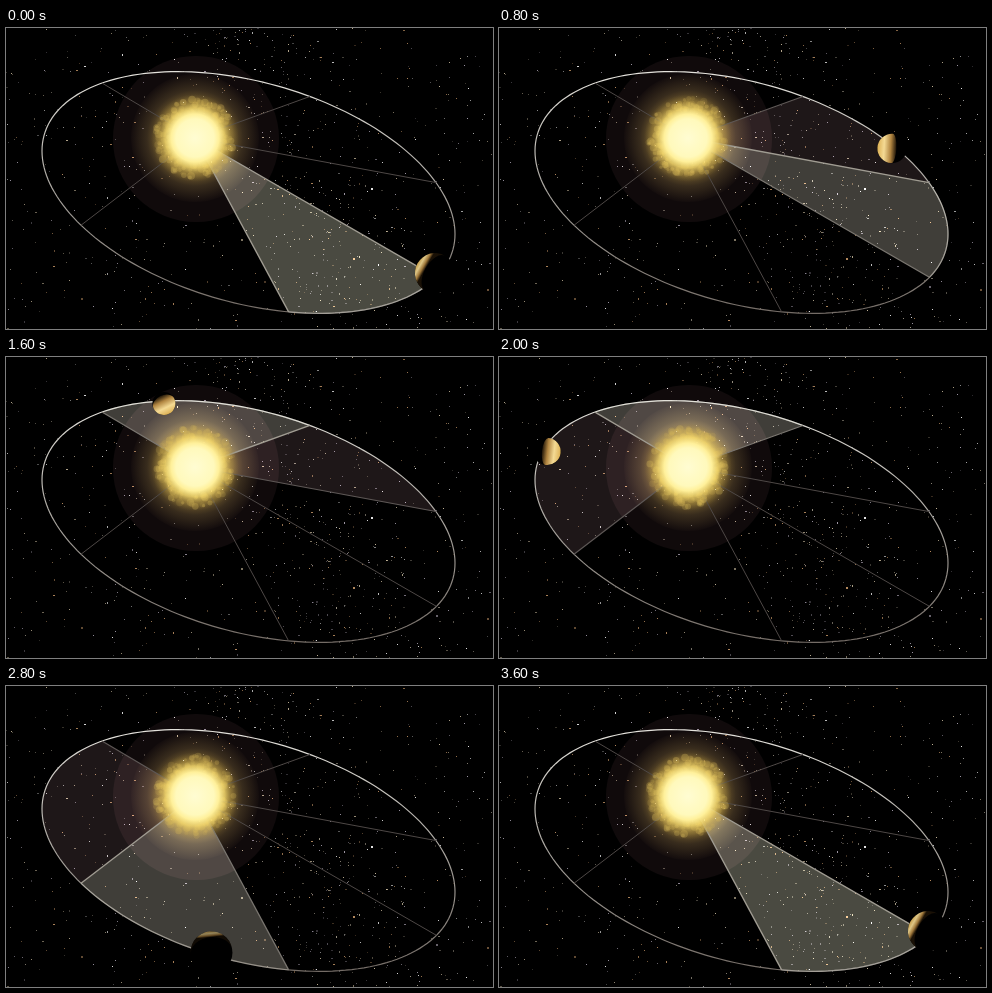
Animation, 487 px wide and 301 px high, one loop 3800 ms. Source, as an HTML page with a canvas:

```html
<!DOCTYPE html>
<html lang="en">
<head>
<meta charset="utf-8">
<title>Equal areas in equal times</title>
<style>
  html, body { margin: 0; width: 100%; height: 100%; overflow: hidden; background: #000; }
  canvas { display: block; }
</style>
</head>
<body>
<canvas id="stage" width="487" height="301"></canvas>
<script>
const WIDTH = 487, HEIGHT = 301;
const STEP_MS = 200, STEPS = 19, STEPS_PER_ORBIT = 18, STEPS_PER_SECTOR = 3;
const sun = { x: 189, y: 110 };
// Orbit angles (degrees) of the sector borders, in the direction of travel.
const borders = [24.5, -24.8, -72.7, -135.2, -215.8, -281.2, -335.5];
const sectorColors = ['#1e1718', '#403e39', '#4a4a41'];
const spokeColors = ['#4e4846', '#5e5856', '#7a7670', '#a09c92'];
const ctx = document.getElementById('stage').getContext('2d');

function randomizer(seed) {
  return () => {
    seed = (seed * 1664525 + 1013904223) % 4294967296;
    return seed / 4294967296;
  };
}

function orbitPoint(degrees, scale = 1) {
  const a = degrees * Math.PI / 180;
  return {
    x: 242.5 + scale * 206.5 * Math.cos(a),
    y: 164.5 + scale * (41.5 * Math.cos(a) + 113.5 * Math.sin(a))
  };
}

function traceOrbit(from, to) {
  const count = Math.ceil(Math.abs(to - from) / 2);
  for (let i = 0; i <= count; i++) {
    const p = orbitPoint(from + (to - from) * i / count);
    ctx.lineTo(p.x, p.y);
  }
}

function disc(x, y, radius, fill) {
  ctx.fillStyle = fill;
  ctx.beginPath();
  ctx.arc(x, y, radius, 0, 2 * Math.PI);
  ctx.fill();
}

function sunGlow(radius, stops) {
  const gradient = ctx.createRadialGradient(sun.x, sun.y, 0, sun.x, sun.y, radius);
  for (const [r, color] of stops) gradient.addColorStop(r / radius, color);
  disc(sun.x, sun.y, radius, gradient);
}

function makeStars() {
  const random = randomizer(77);
  const tints = ['#fff', '#d8c8a8', '#a8a090', '#b0a8b8', '#c89868'];
  return Array.from({ length: 900 }, (_, i) => {
    let x = random() * WIDTH, y = random() * HEIGHT;
    if (i % 3 === 0) x = 235 + y * 0.42 + (random() + random() - 1) * 95;
    return {
      x: Math.floor(x), y: Math.floor(y),
      width: random() < 0.12 ? 2 : 1,
      height: random() < 0.08 ? 2 : 1,
      alpha: 0.25 + 0.65 * random() ** 1.5,
      tint: tints[Math.floor(random() * tints.length)]
    };
  });
}
const stars = makeStars();

function drawStars() {
  for (const star of stars) {
    ctx.globalAlpha = star.alpha;
    ctx.fillStyle = star.tint;
    ctx.fillRect(star.x, star.y, star.width, star.height);
  }
  ctx.globalAlpha = 1;
}

// A sector brightens for three steps, then fades for three: 0 is invisible.
function sectorLevel(sector, step) {
  const full = (sector + 1) * STEPS_PER_SECTOR;
  const gap = Math.abs(step - full) % STEPS_PER_ORBIT;
  return Math.max(0, STEPS_PER_SECTOR - Math.min(gap, STEPS_PER_ORBIT - gap));
}

function drawSectors(levels) {
  ctx.globalCompositeOperation = 'lighter';
  levels.forEach((level, i) => {
    if (!level) return;
    ctx.fillStyle = sectorColors[level - 1];
    ctx.beginPath();
    ctx.moveTo(sun.x, sun.y);
    traceOrbit(borders[i], borders[i + 1]);
    ctx.fill();
  });
  ctx.globalCompositeOperation = 'source-over';
}

function drawLines(levels) {
  const orbitFill = ctx.createLinearGradient(0, 43, 0, 286);
  orbitFill.addColorStop(0, '#e4e2dc');
  orbitFill.addColorStop(0.5, '#a8a49e');
  orbitFill.addColorStop(1, '#746c66');
  ctx.strokeStyle = orbitFill;
  ctx.lineWidth = 1.2;
  ctx.beginPath();
  traceOrbit(0, 360);
  ctx.stroke();

  levels.forEach((level, i) => {
    const glow = level + levels[(i + 5) % 6];
    const end = orbitPoint(borders[i]);
    ctx.strokeStyle = spokeColors[glow];
    ctx.lineWidth = 1 + glow * 0.12;
    ctx.beginPath();
    ctx.moveTo(sun.x, sun.y);
    ctx.lineTo(end.x, end.y);
    ctx.stroke();
    if (level > 1) {
      ctx.strokeStyle = `rgba(220,220,210,${level * 0.15})`;
      ctx.beginPath();
      traceOrbit(borders[i], borders[i + 1]);
      ctx.stroke();
    }
  });
}

function drawHalo() {
  ctx.globalCompositeOperation = 'lighter';
  disc(190, 111, 83, '#100a0b');
  sunGlow(64, [[0, '#685828'], [38, '#54461f'], [48, '#282212'], [64, '#040302']]);
  ctx.globalCompositeOperation = 'source-over';
}

function drawSun(step) {
  const random = randomizer(900 + step * 7919);
  for (let i = 0; i < 170; i++) {
    const angle = random() * 2 * Math.PI;
    const reach = 24 + random() * 16;
    disc(sun.x + reach * Math.cos(angle), sun.y + reach * Math.sin(angle),
      1.5 + random() * 2.5, `rgba(232,200,98,${0.12 + random() * 0.2})`);
  }
  sunGlow(44, [
    [0, '#fffcd2'], [19, '#fff9bc'], [24, '#fff09a'],
    [30, 'rgba(244,216,108,.8)'], [36, 'rgba(205,174,76,.4)'], [44, 'rgba(130,108,44,0)']
  ]);
}

function drawPlanet(step) {
  const sector = Math.floor(step / STEPS_PER_SECTOR);
  const part = step % STEPS_PER_SECTOR / STEPS_PER_SECTOR;
  const evenAngle = borders[sector] + (borders[sector + 1] - borders[sector]) * part;
  const across = Math.cos(evenAngle * Math.PI / 180);
  const depth = Math.sin(evenAngle * Math.PI / 180);
  // The planet runs slightly ahead at both ends and just inside the drawn orbit.
  const { x, y } = orbitPoint(evenAngle - 2 * across ** 2, 0.98);
  const radius = 9.5 + y * 0.043;
  const lit = 0.48 - 0.37 * depth - 0.1 * across;

  disc(x, y, radius, '#000');
  ctx.save();
  ctx.translate(x, y);
  ctx.rotate(Math.atan2(sun.y - y, sun.x - x));
  ctx.globalAlpha = Math.min(1, 0.2 + lit * 3);
  const terminator = radius * (1 - 2 * lit);
  const shade = ctx.createLinearGradient(radius, 0, terminator, 0);
  shade.addColorStop(0, '#dcb054');
  shade.addColorStop(0.35, '#f4da94');
  shade.addColorStop(0.7, '#b08440');
  shade.addColorStop(1, '#1c1206');
  ctx.fillStyle = shade;
  ctx.beginPath();
  ctx.arc(0, 0, radius, -Math.PI / 2, Math.PI / 2);
  ctx.ellipse(0, 0, Math.abs(terminator), radius, 0, Math.PI / 2, -Math.PI / 2, terminator > 0);
  ctx.fill();
  ctx.restore();
}

function draw(now) {
  const step = Math.floor(now / STEP_MS) % STEPS % STEPS_PER_ORBIT;
  const levels = borders.slice(1).map((_, i) => sectorLevel(i, step));
  ctx.fillStyle = '#000';
  ctx.fillRect(0, 0, WIDTH, HEIGHT);
  drawStars();
  drawHalo();
  drawSectors(levels);
  drawLines(levels);
  drawSun(step);
  drawPlanet(step);
  requestAnimationFrame(draw);
}
draw(performance.now());
</script>
</body>
</html>
```
